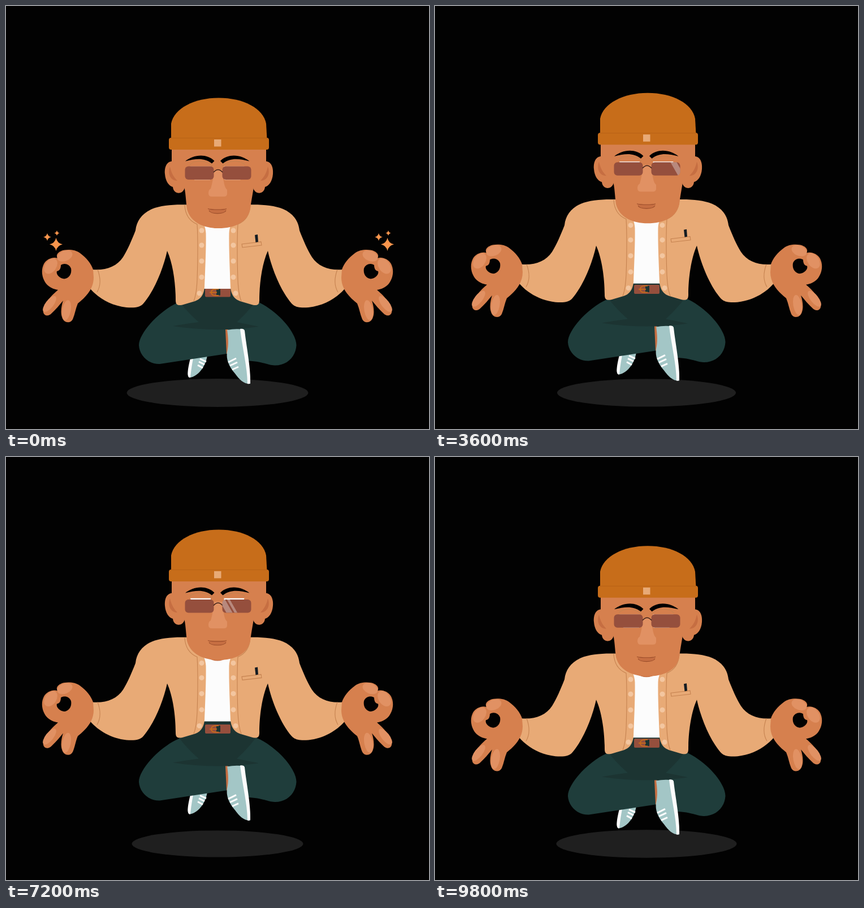
Recreate the animation shown at these times as an HTML page. Size 748 by 748 pixels, loop 10 s.

```html
<!DOCTYPE html>
<html lang="en">
<head>
<meta charset="utf-8">
<title>Levitating meditation</title>
<style>
  html, body { margin: 0; width: 100%; height: 100%; overflow: hidden; background: #020202; }
  svg { display: block; width: 100%; height: 100%; }
  .skin { fill: #d6804e; }
  .pad { fill: #e19163; }
  .shade { fill: #c66e42; }
  .coat { fill: #e8aa76; }
  .seam { fill: none; stroke: #c58250; stroke-width: 1.1; }
  .button { fill: #f3c6a0; }
  .hat { fill: #c76d1a; }
  .pants { fill: #1f3d3b; }
  .fold { fill: #1c3432; }
  .shoe { fill: #a3c6c6; }
  .white { fill: #fcfcfc; }
  .lace { fill: none; stroke: #fcfcfc; stroke-width: 3; }
  .lens { fill: #954f3d; }
  .star { fill: #f8954d; }
</style>
</head>
<body>
<svg id="stage" viewBox="0 0 748 748"></svg>
<script>
const LOOP = 10000, BOB = LOOP / 3, GLINT = 2000, STEP = 200;

const mirror = (axis, art) => `${art}<g transform="translate(${2 * axis}) scale(-1 1)">${art}</g>`;
const path = (cls, d) => `<path class="${cls}" d="${d}"/>`;
const dot = (cls, x, y, r) => `<circle class="${cls}" cx="${x}" cy="${y}" r="${r}"/>`;
const oval = (cls, x, y, rx, ry, turn) =>
  `<ellipse class="${cls}" rx="${rx}" ry="${ry}" transform="translate(${x} ${y}) rotate(${turn})"/>`;
const box = (cls, x, y, w, h, r = 0) =>
  `<rect class="${cls}" x="${x}" y="${y}" width="${w}" height="${h}" rx="${r}"/>`;
const star = (x, y, r) => `<g transform="translate(${x} ${y})"><path class="star twinkle" d="M0 ${-r}
  Q${r * .18} ${-r * .18} ${r} 0 Q${r * .18} ${r * .18} 0 ${r}
  Q${-r * .18} ${r * .18} ${-r} 0 Q${-r * .18} ${-r * .18} 0 ${-r}Z"/></g>`;

const hand =
  `<path class="skin" fill-rule="evenodd" d="M154 466 C151 456 142 445 131 437 C122 430 106 430 98 433
    C91 436 88 441 91 446 C84 443 72 447 67 456 C61 468 64 482 71 491 C77 498 85 501 92 502
    C80 512 69 525 66 535 C64 547 72 550 79 545 C88 537 95 528 101 521 C98 530 96 542 99 550
    C102 561 114 562 118 554 C122 545 123 535 127 526 C142 514 155 500 155 480Z
    M97 458 C103 454 112 456 115 464 C117 475 110 482 103 482.5 C95 482 88 475 90 469 C95 468 97 464 97 458Z"/>` +
  oval('pad', 79, 460, 10, 15, 35) + oval('pad', 104, 442, 14, 9, -22) +
  oval('pad', 77, 527, 7, 17, 38) + oval('pad', 107, 538, 7.5, 18, 10);

const coatHalf =
  path('coat', `M323 351.5 C300 350.5 274 352 258 359 C240 367 231 380 229 397 C222 415 215 431 207 444
    C196 461 176 468 153 466 L149 500 C164 517 186 530 213 533 C228 534 237 533 243 526
    C262 504 278 465 285 433 C295 455 300 490 300 520 C300 529 304 530 312 528.5 L334 522
    C346 518 350 508 351 498 C352 470 354 430 353.5 402 C353 390 348 380 341 371 C333 364 326 359 323 351.5Z`) +
  path('seam', 'M316 352 C317 370 326 381 338 386 C340 420 339 455 338 485 C337 505 334 517 332 522') +
  path('seam', 'M162 466 C168 482 167 496 161 506') +
  [397, 423, 451, 479.5].map(y => dot('button', 346, y, 4.5)).join('') + dot('button', 342, 508, 4.5);

const torso =
  path('white', 'M341 368 L407 368 L400 500 L348 500Z') +
  path('shade', 'M323 351 L425 351 C420 358 413 366 407 371 C398 385 387 393 374 393 C361 393 350 385 341 371 C334 365 328 358 323 351Z') +
  mirror(374, coatHalf) +
  path('seam', 'M417 421 L451 417 L452 423 L418 427Z') +
  '<path fill="#141c22" d="M440 405 L445 404 L446 417 L441.5 418Z"/>' +
  mirror(374, hand) +
  [0, 586].map(dx => star(88.5 + dx, 421.5, 11.5) + star(73 + dx, 408.5, 6.8) + star(90 + dx, 401.5, 4.8)).join('');

const legs =
  path('shoe', 'M327 624 L356 616 C355 634 341 655 325 657 C320 657 321 645 327 624Z') +
  path('white', 'M326 623 L331 623 C328 638 327 648 326 657 C319 658 321 643 326 623Z') +
  path('lace', 'M343 624 L354 629 M341 629 L351 634 M339 635 L348 640') +
  path('pants', `M305 524 L347 491 L401 491 L445 523 C478 538 513 575 513.5 600 C512 622 495 636 475 635.5
    C462 635 457 629 425 627 L400 613 L390 615 L272 633 C252 634 236 618 235 600 C235 578 272 538 305 524Z`) +
  path('fold', 'M307 523 L347 491 L401 491 L441 523 C428 540 416 552 408 559 C420 562 436 564 447 567 C400 574 345 574 295 566 C310 563 325 561 341 559 C326 546 315 534 307 523Z') +
  box('lens', 352, 498.5, 45, 16, 2) +
  '<rect x="372" y="500.5" width="7" height="11" fill="#1b3331"/>' +
  '<path d="M376 500.5 H370 Q363 501 363 506.5 Q363 512 370 512 H376 M360 506.5 H373" fill="none" stroke="#c76d1a" stroke-width="1.8"/>' +
  path('shade', 'M388 572 L393 572 L395 615 L390 615Z') +
  path('shoe', 'M391 573 Q405 570 421 572 C424 600 432 640 432 668 C421 669 413 661 405 650 C394 637 389 625 391 612 C394 600 393 585 391 573Z') +
  path('white', 'M414 571 Q420 570 422 574 C425 602 433 640 432 667 Q430 669 427 668 C427 640 418 605 414 571Z') +
  path('lace', 'M393 630 L407 623 M396 636 L409 630 M400 643 L411 638');

const ear =
  path('skin', 'M296 274.5 C284 274 280 285 281 297 C282 310 288 318 295 320 C296 330 305 333 311 329 C316 325 317 320 317 312 L305 274Z') +
  path('shade', 'M290 284 C285 297 291 309 303 309 C296 302 292 294 290 284Z');
const eye =
  path('white', 'M326 283.8 L362 283.8 L361 307.3 L333 307.3Z') +
  path('seam', 'M325 281 C333 272 354 272 365 283') +
  '<path d="M317 274.5 C330 264 353 259 368.5 274 L364 278.5 C350 268 336 270 317 274.5Z"/>';

const head =
  mirror(376.5, ear) +
  path('skin', 'M293 245 L293 290 L314 314 C318 330 318 345 320 359 C326 383 350 393 376 393 C404 393 427 383 432 359 C434 342 437 329 439 314 L460 290 L460 245Z') +
  path('hat', 'M292 235 L292 208 C297 181 333 162.5 376 162.5 C420 162.5 455 181 460 208 L461.5 235Z') +
  box('hat', 288, 233, 177, 21, 4) +
  '<path d="M291 233.5 H462" stroke="#b86216" stroke-width="1"/>' +
  box('coat', 368, 236, 12.5, 12.5) +
  path('pad', 'M368 290 L383 290 C384 308 386 321 391 325 L391 332 Q391 337 385 337 L364 337 Q358 337 358 331 Q358 325 362 323 Q366 310 368 290Z') +
  path('shade', 'M358 360 L390 360 C387 369 362 369 358 360Z') +
  '<path d="M357 358.5 C365 360.5 384 360.5 390 358.5 M359 362 C363 368.5 385 368.5 389 362" fill="none" stroke="#9a4c2a" stroke-width="1.1"/>' +
  mirror(373.75, eye) +
  `<g id="glasses">${box('lens', 316.5, 283.5, 51, 23.5, 6)}${box('lens', 382.5, 283.5, 51, 23.5, 6)}
    <path d="M367 294 Q375 285 383 294" fill="none" stroke="#3d2018" stroke-width="1.5"/>
    <g clip-path="url(#lenses)"><path id="glint" fill="#fff" fill-opacity=".33"
      d="M0 283 H11 L25 307.5 H14Z M14.5 283 H19.5 L33.5 307.5 H28.5Z"/></g></g>`;

const get = id => document.getElementById(id);
get('stage').innerHTML =
  `<defs><clipPath id="lenses">${box('', 316.5, 283.5, 51, 23.5, 6)}${box('', 382.5, 283.5, 51, 23.5, 6)}</clipPath></defs>
  <ellipse id="shadow" cx="374" cy="684" fill="#1f1f1f"/>
  <g id="legs">${legs}</g><g id="torso">${torso}</g><g id="head">${head}</g>`;
const twinkles = document.querySelectorAll('.twinkle');

const ease = x => (1 - Math.cos(Math.PI * Math.min(1, Math.max(0, x)))) / 2;
// Eased lift: rises from start to top, holds, then sinks from leave to end.
const lift = (p, start, top, leave, end) =>
  p < leave ? ease((p - start) / (top - start)) : 1 - ease((p - leave) / (end - leave));
const place = (id, x, y) => get(id).setAttribute('transform', `translate(${x} ${y})`);

function draw(time) {
  const p = time % BOB / BOB, g = time % GLINT;
  place('head', 0, -139.5 * lift(p, .003, .48, .48, 1.005));
  place('torso', 0, -121 * lift(p, -.005, .47, .47, 1));
  place('legs', 0, -114 * lift(p, .014, .48, .515, .96));
  place('glasses', 0, 3.5 * Math.max(0, Math.sin(Math.PI * p / .6)));
  place('glint', 336 + (g - 800) / 10, 0);

  const shrink = 1 - .203 * lift(p, 0, .455, .455, 1);
  get('shadow').setAttribute('rx', 160.5 * shrink);
  get('shadow').setAttribute('ry', 25 * shrink);

  const size = g < 1000 ? 1 - ease(g / 500) : ease((g - 1800) / 200);
  twinkles.forEach(s => s.setAttribute('transform', `scale(${size})`));
}

function tick() {
  draw(Math.floor(performance.now() % LOOP / STEP) * STEP);
  requestAnimationFrame(tick);
}
tick();
</script>
</body>
</html>
```
